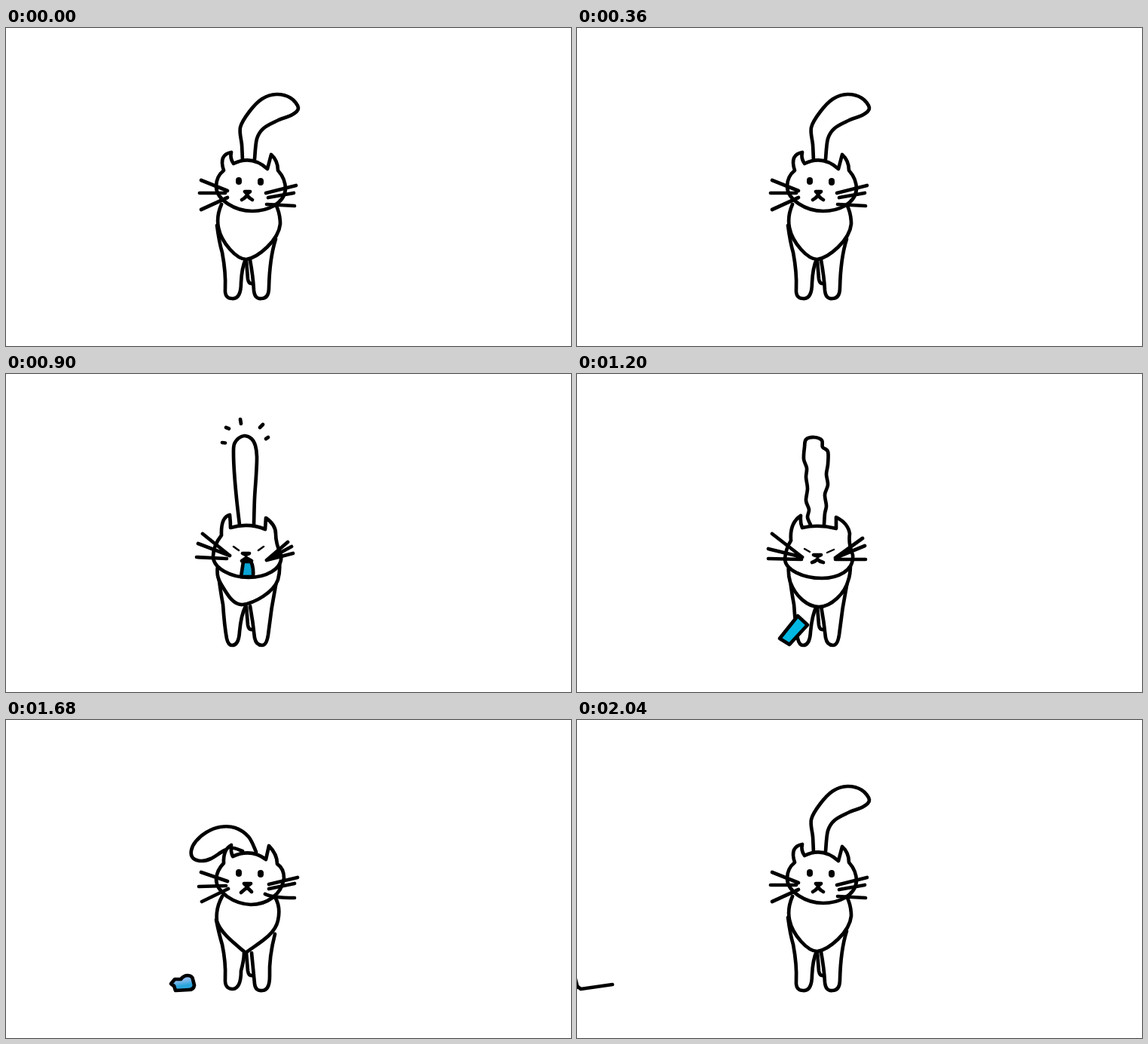
An HTML page that plays this animation: 750x422 px, repeating every 2100 ms.

```html
<!DOCTYPE html>
<html lang="en">
<head>
<meta charset="utf-8">
<title>Cat</title>
<style>
  html, body { margin: 0; width: 100%; height: 100%; overflow: hidden; background: #fff; }
  svg { display: block; width: 750px; height: 422px; }
  path { fill: none; stroke: #000; stroke-width: 4.7; stroke-linecap: round; stroke-linejoin: round; }
  .skin { fill: #fff; }
  #tongue { fill: #0aa5d6; }
  #card { fill: #00b8e2; }
  #blob { fill: url(#wet); }
</style>
</head>
<body>
<svg viewBox="0 0 750 422">
  <defs>
    <linearGradient id="wet" x1="0" y1="0" x2="0.25" y2="1">
      <stop offset="0.4" stop-color="#8cbcee"/>
      <stop offset="0.75" stop-color="#2ba5dd"/>
    </linearGradient>
  </defs>
  <path id="tail" class="skin"/>
  <path id="hind" class="skin" d="M319 309 L321 333 Q322 340 327 339"/>
  <path id="legs" class="skin"/>
  <path id="body" class="skin"/>
  <path id="head" class="skin"/>
  <path id="tongue"/>
  <path id="eyes"/>
  <path id="face"/>
  <path id="whiskers"/>
  <path id="sparks" d="M287 91 L291 91.5 M292 71 L296 72.5 M311 60 L312 66 M337 71 L341 67 M345 86 L348 84"/>
  <path id="card"/>
  <g id="lump">
    <path id="string"/>
    <path id="blob" d="M219 350 L224 344 L232 344 Q236 339 241 339 Q247 339 248 344 L250 352 Q249 358 243 358 L225 359 L223 353 Z"/>
  </g>
</svg>
<script>
const STEP = 60, LOOP = 2100;
const el = id => document.getElementById(id);
const nums = s => s.match(/-?[\d.]+/g).map(Number);

// Blend two strings that share one structure
function mix(a, b, k) {
  const to = nums(b);
  let i = 0;
  return a.replace(/-?[\d.]+/g, n => +(+n + (to[i++] - n) * k).toFixed(2));
}

// Smooth open curve through a list of points
function spline(text) {
  const n = nums(text), p = [];
  for (let i = 0; i < n.length; i += 2) p.push([n[i], n[i + 1]]);
  let d = 'M' + p[0];
  for (let i = 0; i < p.length - 1; i++) {
    const a = p[i], b = p[i + 1], before = p[i - 1] || a, after = p[i + 2] || b;
    const c1 = a.map((v, j) => v + (b[j] - before[j]) / 6);
    const c2 = b.map((v, j) => v - (after[j] - a[j]) / 6);
    d += `C${c1} ${c2} ${b}`;
  }
  return d;
}

const tails = {
  hook: '314,176 313,155 311,132 323,111 340,94 359,88 378,93 388,106 380,115 360,123 342,133 333,147 330,174',
  up: '312,176 311,157 306,140 304,122 306,108 313,99 322,99 331,100 336,109 335,122 330,140 328,157 330,176',
  left: '314,174 302,170 290,173 272,184 259,187 248,183 246,173 252,161 266,149 284,142 304,143 322,155 332,175',
  tall: '310,200 306,165 303,130 302,105 303,93 309,85 317,82 326,86 331,95 333,110 332,135 330,165 329,200',
  shaky: '310,200 306,190 308,180 304,168 306,152 304,137 305,125 301,113 302,97 304,87 315,84 325,88 326,97 333,103 333,120 331,133 333,147 329,160 331,175 329,185 328,200'
};
tails.right = tails.left.split(' ').reverse()
  .map(p => nums(p)).map(([x, y]) => [645 - x, y].join()).join(' ');
tails.upLeft = mix(tails.up, tails.left, 0.5);
tails.upHook = mix(tails.up, tails.hook, 0.5);
tails.hookRight = mix(tails.hook, tails.right, 0.5);

const tense = 'M281 258 Q284 285 288 306 Q290 335 293 351 Q295 360 300 360 Q309 360 310 342 Q312 320 318 308 M324 308 Q328 330 330 350 Q332 360 340 360 Q346 360 348 346 Q352 310 359 275';

const calm = {
  head: 'M302 180 Q326 168 347 187 L352 168 Q361 176 361 189 Q371 200 371 214 C369 234 346 243 327 243 C304 243 279 228 279 210 Q279 197 289 189 Q282 168 299 165 Q297 173 302 180 Z',
  body: 'M286 234 Q279 250 282 265 C286 285 306 307 319 307 C334 305 362 282 364 260 Q364 246 358 234',
  legs: 'M280 262 Q283 285 287 298 Q292 325 291 346 Q290 359 300 359 Q312 360 312 338 Q313 318 318 307 M324 308 Q328 330 329 348 Q330 360 339 359 Q349 359 349 344 Q350 305 358 280',
  whiskers: 'M259 202 L294 216 M257 219 L291 219 M259 241 L294 225 M345 219 L385 209 M348 225 L382 219 M346 234 L383 236',
  eyes: 'M309 202 L309 204 M338 203 L338 205',
  lid: '8',
  face: 'M317 217 L324 217 L320 220 Z M313 228 Q317 226 320 222 Q323 226 327 228'
};
const alert = {
  ...calm,
  head: 'M301 181 Q325 170 345 185 L349 167 Q360 178 360 191 Q369 197 369 210 C366 232 346 245 325 245 C303 244 279 229 279 211 Q280 199 289 190 Q288 172 299 166 Q298 175 301 181 Z',
  body: 'M287 234 Q278 250 280 267 C285 284 308 300 318 309 C332 298 357 286 361 266 Q365 248 357 235',
  legs: 'M279 265 Q283 285 287 298 Q292 322 291 343 Q290 357 301 357 Q312 356 312 333 Q316 318 316 309 M326 309 Q328 330 330 350 Q331 360 340 359 Q350 359 350 340 Q349 315 357 284',
  whiskers: 'M259 202 L294 214 M256 221 L292 220 M260 241 L295 224 M349 218 L387 209 M349 224 L383 217 M344 231 Q353 236 383 236',
  face: 'M316 217 L325 217 L320 221 Z M312 229 L320 222 L326 228'
};
const angry = {
  head: 'M300 183 Q324 169 346 184 L349 170 Q358 177 358 191 Q368 199 368 210 C367 231 343 241 321 241 C299 241 280 228 280 212 Q280 198 290 189 Q288 169 296 167 Q298 175 300 183 Z',
  body: 'M287 234 Q280 248 282 262 C286 284 308 304 319 308 C332 302 361 284 364 260 Q364 246 358 234',
  legs: tense,
  whiskers: 'M259 201 L293 212 M258 220 L291 220 M262 241 L290 228 M348 216 L385 209 M347 226 L383 221 M345 233 L379 235',
  eyes: 'M307 205 L311 207 M341 205 L337 207',
  lid: '4.5',
  face: 'M317 217 L323 217 L320 220 Z M314 229 Q317 226 320 223 Q323 226 326 228'
};
const crouch = {
  head: 'M298 204 Q322 197 344 206 L345 191 Q358 200 358 212 Q358 225 365 240 C368 260 343 270 322 270 C299 270 275 258 275 242 Q275 228 286 214 Q285 190 297 187 Q298 196 298 204 Z',
  body: 'M281 256 Q279 268 285 278 C293 291 301 307 314 306 C330 304 355 290 361 273 Q364 262 363 250',
  legs: tense,
  whiskers: 'M261 212 L297 241 M255 225 L297 241 M253 243 L293 245 M346 247 L374 223 M346 247 L379 229 M346 247 L381 238',
  eyes: 'M302 229 L309 234 M342 229 L335 234',
  lid: '2.6',
  face: 'M314 238 L323 238 L318 240 Z M313 248 Q316 246 319 244 Q323 246 326 248'
};
const shiver = {
  head: 'M299 204 Q320 199 344 205 L344 190 Q360 198 362 212 Q360 225 366 240 C368 262 345 271 325 271 C300 271 276 260 276 245 Q277 232 284 221 Q282 198 297 188 Q296 197 299 204 Z',
  body: 'M281 256 Q280 266 283 276 C290 295 306 309 321 309 C338 309 356 290 360 274 Q363 266 363 252',
  legs: tense,
  whiskers: 'M259 212 L299 243 M254 232 L299 243 M254 245 L298 246 M343 244 L379 218 M343 244 L382 228 M343 246 L383 246',
  eyes: 'M302 232 L309 236 M341 233 L332 237',
  lid: '2.4',
  face: 'M314 240 L324 240 L320 242 Z M312 250 Q316 249 319 246 Q322 249 327 250'
};

const cards = {
  mouth: 'M313 272 L329 272 L329 308 L313 308 Z',
  fall: 'M293 321 L306 333 L282 359 L269 351 Z',
  land: 'M223 345 L246 340 L250 352 L224 358 Z'
};

const blend = (a, b, k) =>
  Object.fromEntries(Object.keys(a).map(key => [key, mix(a[key], b[key], k)]));
const sway = (pose, ...names) => names.map(n => ({ pose, tail: tails[n] }));
const duck = k => ({ pose: blend(angry, crouch, k), tail: mix(tails.up, tails.tall, k) });
const heave = reach => ({ ...duck(1), reach, sparks: true });
const shake = card => ({ pose: shiver, tail: tails.shaky, card });

const steps = [
  ...sway(calm, 'hook', 'right', 'hookRight', 'up', 'left', 'upHook', 'hook', 'hook', 'right', 'hookRight'),
  duck(0), duck(0.35), duck(0.7), duck(1),
  heave(259), heave(269), heave(281), heave(295), heave(308),
  shake(mix(cards.mouth, cards.fall, 0.5)),
  shake(cards.fall),
  shake(mix(cards.fall, cards.land, 0.5)),
  shake(), duck(0.5), duck(0),
  ...sway(alert, 'up', 'hookRight', 'up', 'left', 'upLeft'),
  ...sway(calm, 'up', 'upHook', 'right', 'hookRight', 'hook')
];
const LANDED = 22, LEAVING = 28;

const show = (id, on) => el(id).style.display = on ? '' : 'none';

function draw(i) {
  const { pose, tail, reach, card, sparks } = steps[i];
  for (const part of ['head', 'body', 'legs', 'whiskers', 'eyes', 'face'])
    el(part).setAttribute('d', pose[part]);
  el('eyes').style.strokeWidth = pose.lid;
  el('tail').setAttribute('d', spline(tail));

  show('sparks', sparks);
  show('tongue', reach);
  if (reach) el('tongue').setAttribute('d', `M315 249 L312 ${reach} L328 ${reach} Q329 256 325 249 Z`);
  show('card', card);
  if (card) el('card').setAttribute('d', card);

  // The lump slides off to the left, trailing a string
  const gone = Math.max(0, i - LEAVING);
  const out = Math.min(1, gone / 2);
  show('lump', i >= LANDED);
  show('string', gone);
  el('string').setAttribute('d', mix('M250 353 L250 353 L250 353', 'M250 353 L255 357 L297 351', out));
  el('lump').setAttribute('transform', `translate(${-250 * gone / 6})`);
}

let last = -1;
function tick() {
  const i = Math.floor(performance.now() % LOOP / STEP);
  if (i !== last) draw(last = i);
  requestAnimationFrame(tick);
}
tick();
</script>
</body>
</html>
```
